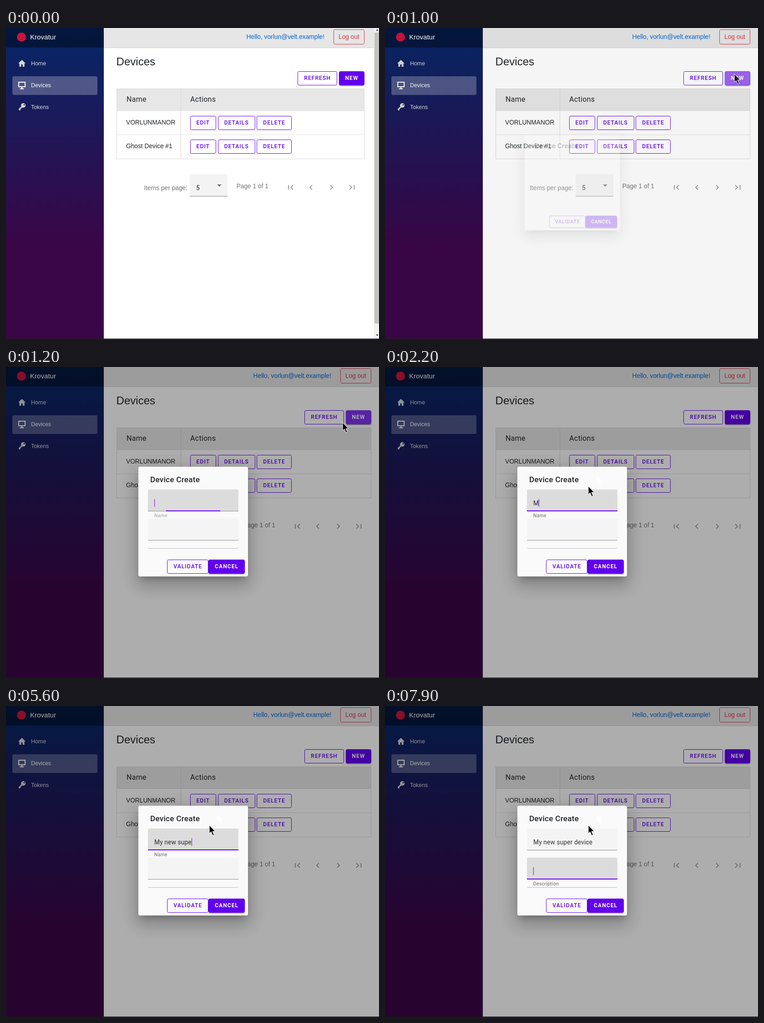
An HTML page for the animation above (8 s loop, 820 px wide and 683 px high).

```html
<!DOCTYPE html>
<html lang="en">
<head>
<meta charset="utf-8">
<title>Devices</title>
<style>
  html, body { margin: 0; width: 100%; height: 100%; overflow: hidden; background: #fff; }
  body { position: relative; font: 13.76px/20px "Liberation Sans", Arial, sans-serif; color: #212529; }
  div, span, b, svg { position: absolute; box-sizing: border-box; white-space: pre; }
  svg { left: 0; top: 0; overflow: visible; }
  .fill { inset: 0; }
  .muted { color: #777; }

  #side { left: 0; top: 0; width: 215px; height: 683px; color: #d7d7d7; font-size: 12.4px;
    background: linear-gradient(180deg, rgb(5,39,103) 0%, #3a0647 70%); }
  #brand { left: 0; top: 0; width: 215px; height: 43px; background: rgba(0,0,0,.4); }
  #active { left: 14px; top: 106px; width: 187px; height: 41px; border-radius: 3.4px; background: rgba(255,255,255,.25); }
  #side b { font-weight: 400; color: #fff; }

  #main { left: 215px; top: 0; height: 683px; }
  #bar { left: 0; top: 0; width: 100%; height: 44px; background: #e6e6e6; border-bottom: 1px solid #d2d2d2; }
  #logout { right: 21px; top: 3px; width: 68px; height: 33px; border: 1px solid #dc3545; border-radius: 3.4px;
    color: #dc3545; line-height: 32px; text-align: center; }
  #table { left: 28px; right: 21px; top: 133px; height: 155px; border: 1px solid #dadada; }
  #head { left: 0; right: 0; top: 0; height: 48px; background: #e7e7e7; border-bottom: 1px solid #dadada; }
  #rule { left: 0; right: 0; top: 100px; height: 1px; background: #dfdfdf; }
  #col { left: 140px; top: 0; bottom: 0; width: 1px; background: #d6d6d6; }
  .th { font: 16px/20px Roboto, sans-serif; letter-spacing: .3px; }
  .row { display: flex; gap: 3.83px; }
  .btn { position: static; height: 31px; padding: 0 12.9px; border: 1px solid #6200ee; border-radius: 3.4px;
    color: #6200ee; font: 500 12.04px/29px Roboto, sans-serif; letter-spacing: 1.07px; }
  .solid { background: #6200ee; color: #fff; font-weight: 700;
    box-shadow: 0 3px 1px -2px rgba(0,0,0,.2), 0 2px 2px rgba(0,0,0,.14), 0 1px 5px rgba(0,0,0,.12); }
  #select { right: 322px; top: 321px; width: 83px; height: 49px; background: #f3f3f3;
    border-bottom: 1px solid #8a8a8a; border-radius: 3.4px 3.4px 0 0; }
  #pager { left: auto; right: 29px; top: 335px; }

  #scroll { left: 809px; top: 0; width: 15px; height: 683px; background: #f1f1f1; }
  #thumb { left: 1px; top: 10px; width: 13px; height: 639px; }
  #edge { left: 0; bottom: 0; width: 820px; height: 1px; background: #222; }
  #scrim { background: #000; }

  #dialog { left: 291px; top: 219px; width: 241px; height: 241px; border-radius: 3.4px; background: #fafafa;
    box-shadow: 0 10px 13px -6px rgba(0,0,0,.2), 0 21px 33px 3px rgba(0,0,0,.14), 0 8px 40px 7px rgba(0,0,0,.12); }
  #title { left: 26px; top: 18px; font: 500 17.2px/20px Roboto, sans-serif; letter-spacing: .215px; }
  .field { left: 21px; width: 199px; height: 48px; border-radius: 3.4px 3.4px 0 0; border-bottom: 1px solid #8a8a8a; }
  .line { left: 0; right: 0; bottom: -1px; height: 2px; background: #6200ee; }
  .value { left: 14px; top: 20px; font: 13.76px/20px Roboto, sans-serif; letter-spacing: .129px; color: rgba(0,0,0,.8); }
  .value i { font-style: normal; }
  .caret { left: 100%; top: 1px; width: 1px; height: 17px; background: #6200ee; }
  .hint { left: 14px; top: 48px; font: 10.3px/20px Roboto, sans-serif; letter-spacing: .344px; color: rgba(0,0,0,.6); }
  #under { left: 21px; top: 170px; width: 199px; height: 10px; border: solid #b8b8b8; border-width: 0 0 1px;
    border-radius: 0 0 4px 4px; }
</style>
</head>
<body>
<div id="side">
  <div id="brand"></div>
  <div id="active"></div>
  <svg width="215" height="200" fill="#d7d7d7">
    <circle cx="34" cy="20" r="10" fill="#c8143c"/>
    <path d="M35 70l-8 7.7h2.4V85h4v-5h3.2v5h4v-7.3H43z"/>
    <path d="M28 119h14v10h-14zM35 129v4M30.500 133.500h9" fill="none" stroke="#fff" stroke-width="2"/>
    <path d="M36 172l-7.500 7.500M30 177v4" fill="none" stroke="#d7d7d7" stroke-width="3"/>
    <path fill-rule="evenodd" d="M38 165a5 5 0 1 0 .01 0zM40 167a1.500 1.500 0 1 1-.01 0z"/>
  </svg>
  <span style="left:53px;top:10px;font-size:15.1px;color:#fff">Krovatur</span>
  <span style="left:55px;top:68px">Home</span>
  <b style="left:55px;top:116px">Devices</b>
  <span style="left:55px;top:164px">Tokens</span>
</div>

<div id="main">
  <div id="bar"></div>
  <span style="right:109px;top:10px;color:#0366d6">Hello, vorlun@velt.example!</span>
  <div id="logout">Log out</div>
  <span style="left:27.5px;top:64px;font-size:24.08px">Devices</span>
  <div class="row" style="right:20.64px;top:95px"><div class="btn">REFRESH</div><div class="btn solid" id="new">NEW</div></div>
  <div id="table">
    <div id="head"></div><div id="rule"></div><div id="col"></div>
    <span class="th" style="left:21px;top:13px">Name</span>
    <span class="th" style="left:161px;top:13px">Actions</span>
  </div>
  <span class="muted" style="right:410px;top:342px">Items per page:</span>
  <div id="select">
    <span style="left:14px;top:20px;font-family:Roboto,sans-serif">5</span>
    <svg width="83" height="48"><path d="M60 22.500h10l-5 5z" fill="#757575"/></svg>
  </div>
  <span class="muted" style="right:232px;top:338px">Page 1 of 1</span>
  <svg id="pager" width="170" height="30" viewBox="610 335 170 30" fill="none" stroke="#8a8a8a" stroke-width="1.600">
    <path d="M621 345v10M631 345l-5 5 5 5M673 345l-5 5 5 5M713 345l5 5-5 5M755 345l5 5-5 5M765.500 345v10"/>
  </svg>
</div>

<div id="scroll">
  <div id="thumb"></div>
  <svg width="15" height="683" fill="#505050"><path d="M4 6l3-3.500 3 3.500zM4 673l3 3.500 3-3.500z"/></svg>
</div>
<div id="edge"></div>
<div id="scrim" class="fill"></div>

<div id="dialog">
  <span id="title">Device Create</span>
  <div id="form"><div id="under"></div></div>
  <div class="row" style="right:7px;top:204px;gap:0"><div class="btn">VALIDATE</div><div class="btn solid">CANCEL</div></div>
</div>

<svg id="trail" width="1" height="1"><path d="M0 0v17l4-3.700 3.500 8 3-1.300-3.500-8h5.500z" fill="#fff"/></svg>
<svg id="cursor" width="1" height="1"><path d="M0 0v18l4-3.800 3.400 8 3-1.300-3.400-7.700h5.700z" stroke="#fff" stroke-width="1"/></svg>

<script>
const $ = id => document.getElementById(id);
const LOOP = 8000, STEP = 100;

function add(parent, cls, text = "", css = "") {
  const el = document.createElement("div");
  el.className = cls;
  el.textContent = text;
  el.style.cssText = css;
  parent.append(el);
  return el;
}

["VORLUNMANOR", "Ghost Device #1"].forEach((name, i) => {
  const y = 193 + i * 52.4;
  add($("main"), "", name, `left:49px;top:${y + 5}px`);
  const row = add($("main"), "row", "", `left:189.7px;top:${y}px`);
  ["EDIT", "DETAILS", "DELETE"].forEach(label => add(row, "btn", label));
});

function makeField(y, label) {
  const box = add($("form"), "field", "", `top:${y}px`);
  const value = add(box, "value");
  const text = value.appendChild(document.createElement("i"));
  return { box, text, caret: add(value, "caret"), line: add(box, "line"), hint: add(box, "hint", label) };
}
$("form").className = "fill";
const nameField = makeField(50, "Name");
const descField = makeField(114, "Description");

function setField(f, text, focused, line, lineAlpha, hint, caret) {
  f.text.textContent = text || "\u200b";
  f.box.style.background = focused ? "#dcdcdc" : "#f4f4f4";
  f.line.style.transform = `scaleX(${line})`;
  f.line.style.opacity = lineAlpha;
  f.hint.style.opacity = hint;
  f.caret.style.opacity = +caret;
}

const typing = [
  [0, ""], [2200, "M"], [2600, "My"], [2900, "My "],
  [3600, "My n"], [3700, "My ne"], [3800, "My new"], [4000, "My new "],
  [4200, "My new s"], [4500, "My new su"], [4600, "My new supe"],
  [4800, "My new super"], [4900, "My new super f"], [5100, "My new super "],
  [5300, "My new super"], [5400, "My new supe"], [5500, "My new sup"],
  [5600, "My new supe"], [5800, "My new super"], [5900, "My new super "],
  [6200, "My new sup"], [6300, "My new supe"], [6400, "My new super "],
  [6600, "My new super d"], [7000, "My new super de"], [7100, "My new super dev"],
  [7300, "My new super devi"], [7400, "My new super devic"], [7500, "My new super device"]
];

const path = [
  [500, 812, 175], [600, 795, 140], [800, 768, 101], [1000, 768, 101], [1100, 767, 100],
  [1200, 740, 122], [1300, 695, 147], [1600, 530, 215], [1800, 465, 238], [1900, 447, 262]
];

// latest row whose time has been reached
const at = (rows, t) => rows.filter(r => r[0] <= t).pop();

function track(rows, t) {
  const a = at(rows, t) || rows[0];
  const b = rows[rows.indexOf(a) + 1];
  if (!b) return a.slice(1);
  const k = Math.max(0, (t - a[0]) / (b[0] - a[0]));
  return a.slice(1).map((v, i) => v + (b[i + 1] - v) * k);
}

function move(el, [x, y], shown) {
  el.style.transform = `translate(${x}px,${y}px)`;
  el.style.visibility = shown ? "visible" : "hidden";
}

function draw(t) {
  const open = t >= 1000;
  $("main").style.width = (open ? 609 : 594) + "px";
  $("scroll").style.display = open ? "none" : "block";
  $("thumb").style.background = t >= 100 && t < 600 ? "#a8a8a8" : "#c1c1c1";

  const [, fill, ring] = at([[0, "#6200ee"], [700, "#6e14ef"], [900, "#a064f2", "#5a5ae8"], [1200, "#8033f1"], [1300, "#6200ee"]], t);
  $("new").style.background = fill;
  $("new").style.borderColor = ring || fill;

  const [, shade, alpha, scale] = at([[0, 0, 0, .8], [1000, .04, .25, .871], [1100, .25, 1, .993], [1200, .32, 1, 1]], t);
  $("scrim").style.opacity = shade;
  $("dialog").style.opacity = alpha;
  $("dialog").style.transform = scale < 1 ? `scale(${scale})` : "none";
  $("form").style.opacity = t < 1100 ? 0 : 1;

  const first = t >= 1200 && t < 7600, second = t >= 7600;
  const blink = (t >= 1700 && t < 2200) || (t >= 3100 && t < 3600);
  const grow = t < 1200 ? 0 : t < 1300 ? .6 : 1;
  setField(nameField, at(typing, t)[1], first, grow, t < 7600 ? 1 : t < 7800 ? .5 : 0,
    t < 7800 ? grow : 0, first && !blink);
  setField(descField, "", second, second ? (t < 7800 ? .5 : 1) : 0, 1,
    t < 7800 ? 0 : t < 7900 ? .5 : 1, second);

  move($("cursor"), track(path, t), t >= 500);
  move($("trail"), [465, 238], t >= 1900);
}

function tick() {
  draw(Math.floor(performance.now() % LOOP / STEP) * STEP);
  requestAnimationFrame(tick);
}
tick();
</script>
</body>
</html>
```
